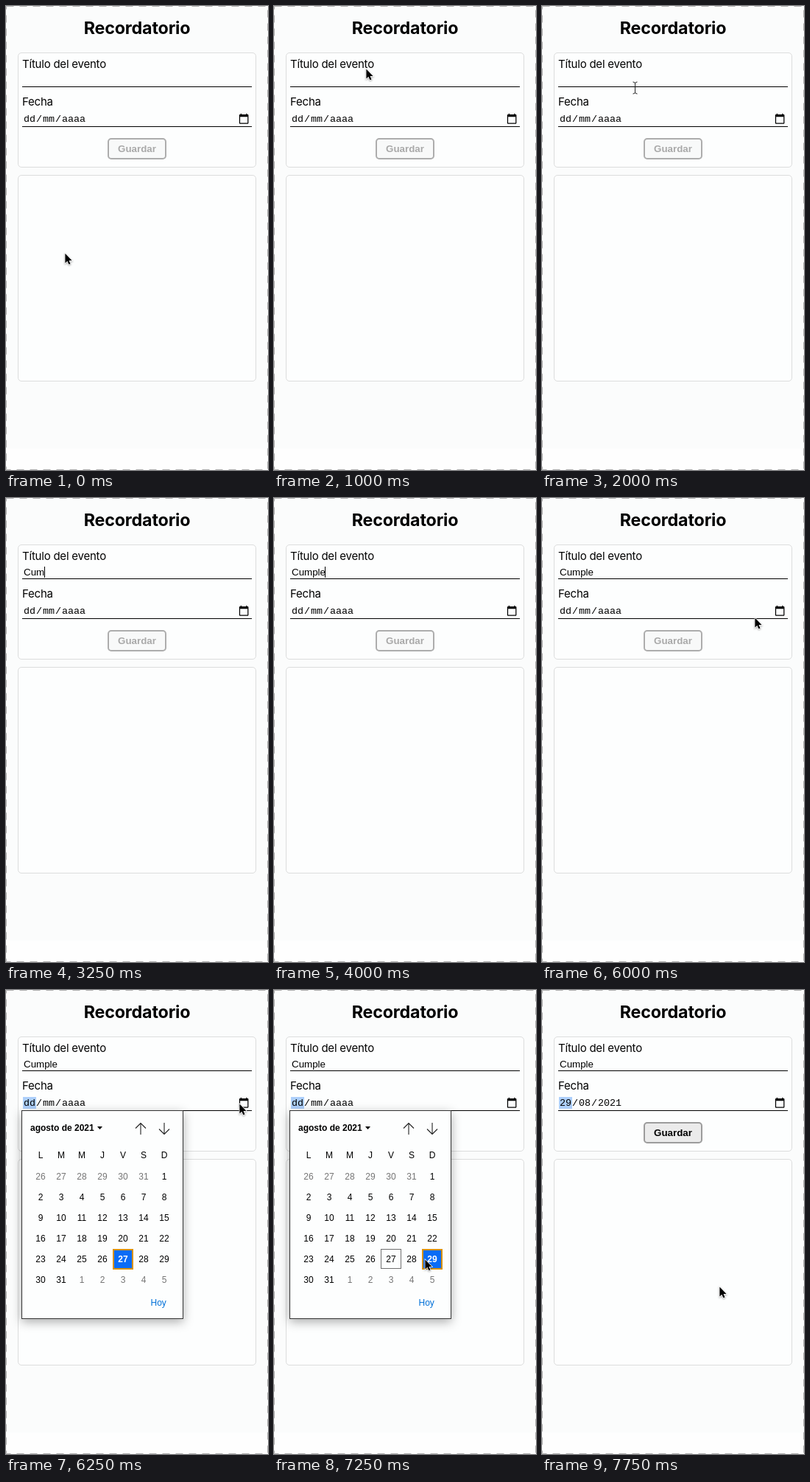
These frames come from a looping animation (356x629 px, 8 s). An HTML page:

```html
<!DOCTYPE html>
<html lang="es">
<head>
<meta charset="utf-8">
<title>Recordatorio</title>
<style>
  html, body { margin: 0; width: 100%; height: 100%; overflow: hidden; background: #fefefe; }
  svg { display: block; width: 356px; height: 629px; }
  text { font: 12px "Liberation Sans", Arial, sans-serif; white-space: pre; }
  .title { font: 700 23.3px Inter, sans-serif; letter-spacing: -.18px; text-anchor: middle; }
  .label { font: 15px Inter, sans-serif; letter-spacing: -.22px; }
  .field { font-size: 13.333px; }
  .mono { font: 13.333px "Liberation Mono", monospace; }
  .button { font-size: 13.333px; font-weight: 700; text-anchor: middle; }
  .bold { font-weight: 700; }
  .mid { text-anchor: middle; }
  .card { fill: #fdfefe; stroke: #dcdddd; }
  .arrow { fill: none; stroke: #222; stroke-width: 1.1; }
  #popup { filter: drop-shadow(0 4px 7px rgba(0, 0, 0, .32)); }
  #pointer { filter: drop-shadow(0 1px 1px rgba(0, 0, 0, .35)); }
</style>
</head>
<body>
<svg viewBox="0 0 356 629">
  <rect width="356" height="600" fill="#fbfcfc"/>
  <rect x=".5" y=".5" width="355" height="628" fill="none" stroke="#b2b2b2" stroke-dasharray="10 8"/>
  <text class="title" x="178" y="38">Recordatorio</text>
  <rect class="card" x="16.5" y="63.5" width="323" height="155" rx="4.5"/>
  <rect class="card" x="16.5" y="229.5" width="323" height="279" rx="4.5"/>

  <text class="label" x="22" y="84">Título del evento</text>
  <text class="field" id="name" x="24" y="105"></text>
  <rect id="caret" y="93" width="1" height="15"/>
  <rect x="22" y="109" width="312" height="1"/>

  <text class="label" x="22" y="135">Fecha</text>
  <rect id="mark" x="23" y="145" width="18" height="16" fill="#adcffb"/>
  <g id="date"></g>
  <path transform="translate(315.6 145.2) scale(.63)" d="M20 3h-1V1h-2v2H7V1H5v2H4c-1.1 0-2 .9-2 2v16c0 1.1.9 2 2 2h16c1.1 0 2-.9 2-2V5c0-1.1-.9-2-2-2zm0 18H4V8h16z"/>
  <rect x="22" y="163" width="312" height="1"/>

  <rect id="save" x="139" y="180" width="78" height="27" rx="4" stroke-width="2"/>
  <text class="button" id="saveText" x="178" y="198">Guardar</text>

  <g id="popup">
    <rect x="21.5" y="163.5" width="219" height="282" fill="#fdfefe" stroke="#333"/>
    <text class="bold" x="33" y="191">agosto de 2021</text>
    <path d="M124 185h7l-3.5 4z"/>
    <path class="arrow" d="M183 196V180.5M176 187.5l7-7 7 7M215 180v15.5M208 188.5l7 7 7-7"/>
    <g id="days"></g>
    <text x="196.5" y="428" fill="#0070d8">Hoy</text>
  </g>

  <g id="pointer">
    <path transform="translate(-.6 .6) scale(.92)" d="M0 0v14l3.2-3 2.2 5 2.4-1-2.2-4.9h4.4z" stroke="#fff" stroke-width="1.6" paint-order="stroke"/>
  </g>
  <path id="beam" transform="translate(126.5 111)" d="M-3-8q3 0 3 2v12q0 2-3 2M3-8q-3 0-3 2v12q0 2 3 2" fill="none" stroke="#222"/>
</svg>
<script>
const LOOP = 8000, STEP = 250, BLINK = 500;
const FOCUS = 1500, TYPING = 2750, HOVER = 4500, BLUR = 5500;
const OPEN = 6250, PICK = 7250, DONE = 7500;

// Typing bursts: when, and how much of the word is there.
const bursts = [
  { time: FOCUS, text: "" }, { time: TYPING, text: "C" }, { time: 3250, text: "Cum" },
  { time: 3750, text: "Cump" }, { time: 4000, text: "Cumple" }
];

// Pointer key points; power bends the pace of the move that ends there.
const path = [
  { time: 0, x: 81, y: 335 },
  { time: 500, x: 175, y: 356, power: .6 },
  { time: 1000, x: 126, y: 85, power: 1.7 },
  { time: 1250, x: 123, y: 101 },
  { time: HOVER, x: 126, y: 111 },
  { time: 5000, x: 187, y: 190 },
  { time: BLUR, x: 189, y: 193 },
  { time: OPEN, x: 318, y: 154, power: .6 },
  { time: PICK, x: 206, y: 365 },
  { time: 7750, x: 242, y: 402 }
];

const $ = id => document.getElementById(id);
const show = (id, on) => $(id).setAttribute("visibility", on ? "visible" : "hidden");

function pointerAt(t) {
  const i = path.findIndex(p => p.time >= t);
  if (i === 0) return [path[0].x, path[0].y];
  const a = path[i - 1], b = path[i];
  const k = ((t - a.time) / (b.time - a.time)) ** (b.power || 1);
  return [a.x + (b.x - a.x) * k, a.y + (b.y - a.y) * k];
}

function calendar(selected) {
  const label = (text, x, y, fill = "#000", extra = "") =>
    `<text class="mid ${extra}" x="${x}" y="${y}" fill="${fill}">${text}</text>`;
  let out = "";
  [..."LMMJVSD"].forEach((d, i) => out += label(d, 47 + 28 * i, 228));
  for (let i = 0; i < 42; i++) {
    const x = 47 + 28 * (i % 7), y = 257 + 28 * Math.floor(i / 7);
    const day = i - 5, inMonth = day > 0 && day < 32;
    const number = (day + 30) % 31 + 1;
    if (day === selected) {
      out += `<rect x="${x - 13}" y="${y - 17}" width="26" height="26" fill="#0a6cf7" stroke="#d9920f" stroke-width="2"/>`;
      out += label(number, x, y, "#fff", "bold");
      continue;
    }
    if (day === 27) {
      out += `<rect x="${x - 13.5}" y="${y - 17.5}" width="27" height="26" fill="none" stroke="#6f6f6f"/>`;
    }
    out += label(number, x, y, inMonth ? "#000" : "#757575");
  }
  return out;
}

function dateText(date) {
  let x = 24;
  return date.split(/(\/)/).map(part => {
    const out = `<text class="mono" x="${x}" y="157">${part}</text>`;
    x += 8 * part.length + 1;
    return out;
  }).join("");
}

function drawName(t) {
  const burst = bursts.findLast(b => b.time <= t) || bursts[0];
  $("name").textContent = burst.text;
  const width = burst.text ? $("name").getComputedTextLength() : 0;
  $("caret").setAttribute("x", Math.floor(24 + width));
  const lit = Math.floor((t - burst.time) / BLINK) % 2 === 0;
  show("caret", t >= FOCUS && t < BLUR && lit);
}

function draw(t) {
  const done = t >= DONE;
  drawName(t);
  show("mark", t >= OPEN);
  $("date").innerHTML = dateText(done ? "29/08/2021" : "dd/mm/aaaa");

  $("save").setAttribute("fill", done ? "#ebebeb" : "#f8f9f9");
  $("save").setAttribute("stroke", done ? "#9c9c9c" : "#adadad");
  $("saveText").setAttribute("fill", done ? "#000" : "#a9a9a9");

  show("popup", t >= OPEN && !done);
  $("days").innerHTML = calendar(t >= PICK ? 29 : 27);

  show("pointer", t < FOCUS || t >= HOVER);
  $("pointer").setAttribute("transform", `translate(${pointerAt(t).map(Math.round)})`);
  show("beam", t >= FOCUS && t < TYPING);
}

const begin = performance.now();
let last = -1;
function tick() {
  const t = Math.floor(((performance.now() - begin) % LOOP) / STEP) * STEP;
  if (t !== last) draw(last = t);
  requestAnimationFrame(tick);
}
tick();
</script>
</body>
</html>
```
